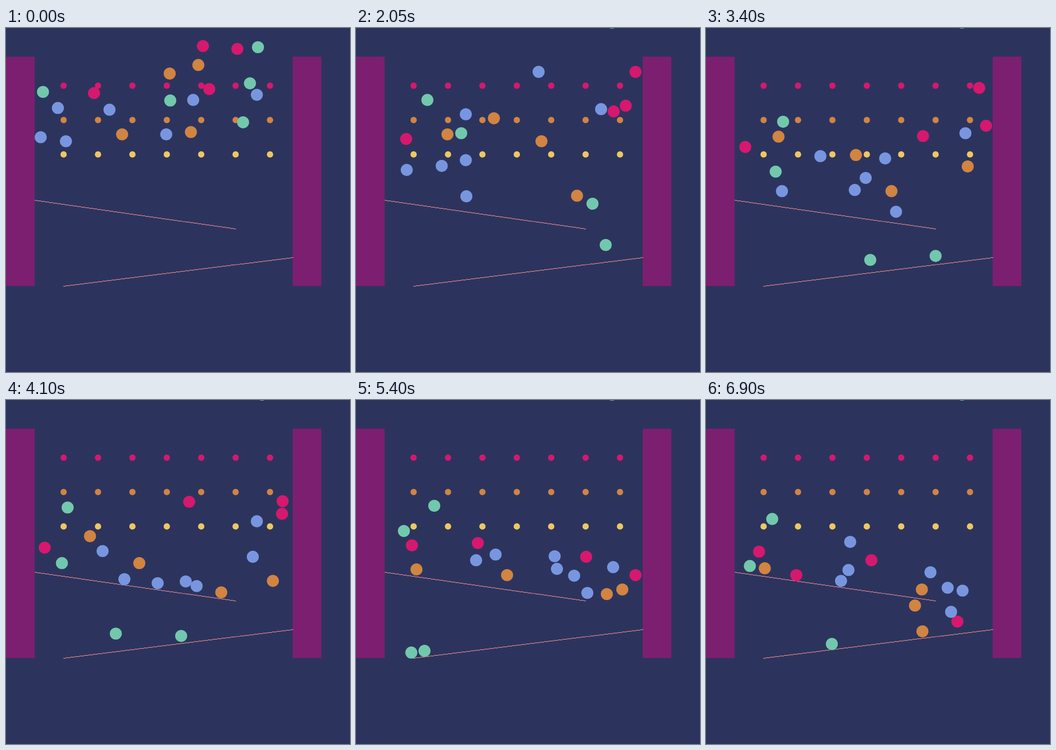
Write an HTML page that moves like this. It is 748 px wide and 748 px high and loops after 6950 ms.

```html
<!DOCTYPE html>
<html lang="en">
<head>
<meta charset="utf-8">
<title>Bouncing balls</title>
<style>
  html, body { margin: 0; width: 100%; height: 100%; overflow: hidden; background: #2c345e; }
  svg { display: block; width: 100vw; height: 100vh; }
</style>
</head>
<body>
<svg id="stage" viewBox="0 0 600 600"></svg>
<script>
const stage = document.getElementById('stage');
const LOOP = 6950, STEP = 50, SUBSTEPS = 20;
const GRAVITY = 80, BOUNCE = 0.75, BALL = 10, PEG = 5;
const PINK = '#d6186e', ORANGE = '#d28441', YELLOW = '#efc75e';
const GREEN = '#72c8ac', BLUE = '#7896e0', WALL = '#7d1f70', RAMP = '#ff9090';
const balls = [], obstacles = [];

const clamp = (v, lo, hi) => Math.max(lo, Math.min(hi, v));

function add(tag, attrs) {
  const node = document.createElementNS('http://www.w3.org/2000/svg', tag);
  for (const key in attrs) node.setAttribute(key, attrs[key]);
  return stage.appendChild(node);
}

// An obstacle is the nearest point of its shape plus a thickness around it.
function wall(x, y, width, height) {
  add('rect', { x, y, width, height, fill: WALL });
  obstacles.push({ r: 0, nearest: b => [clamp(b.x, x, x + width), clamp(b.y, y, y + height)] });
}

function peg(x, y, fill) {
  add('circle', { cx: x + 0.5, cy: y + 0.5, r: PEG + 0.5, fill });
  obstacles.push({ r: PEG, nearest: () => [x, y] });
}

function ramp(x1, y1, x2, y2) {
  const dx = x2 - x1, dy = y2 - y1, rows = Math.abs(dy), run = dx / rows;
  let d = '';
  for (let i = 0; i <= rows; i++) {
    const from = Math.ceil(clamp(x1 + (i - 0.5) * run, x1, x2));
    const to = Math.ceil(clamp(x1 + (i + 0.5) * run, x1, x2 + 1));
    d += `M${from} ${y1 + i * Math.sign(dy) + 0.5}H${to}`;
  }
  add('path', { d, stroke: RAMP, 'stroke-width': 1 });
  obstacles.push({
    r: 0,
    nearest(b) {
      const k = clamp(((b.x - x1) * dx + (b.y - y1) * dy) / (dx * dx + dy * dy), 0, 1);
      return [x1 + dx * k, y1 + dy * k];
    }
  });
}

function launch(fill, starts) {
  for (const [x, y, vx, vy] of starts) {
    balls.push({ x, y, vx, vy, gone: false, track: [], node: add('circle', { r: BALL + 0.5, fill }) });
  }
}

function hitObstacle(b, { r, nearest }) {
  const [px, py] = nearest(b);
  const dx = b.x - px, dy = b.y - py, gap = Math.hypot(dx, dy), reach = BALL + r;
  if (gap >= reach || gap === 0) return;
  const nx = dx / gap, ny = dy / gap, speed = b.vx * nx + b.vy * ny;
  b.x = px + nx * reach;
  b.y = py + ny * reach;
  if (speed < 0) {
    b.vx -= (1 + BOUNCE) * speed * nx;
    b.vy -= (1 + BOUNCE) * speed * ny;
  }
}

function hitBall(a, b) {
  const dx = a.x - b.x, dy = a.y - b.y, gap = Math.hypot(dx, dy);
  if (gap >= 2 * BALL || gap === 0) return;
  const nx = dx / gap, ny = dy / gap;
  const speed = (a.vx - b.vx) * nx + (a.vy - b.vy) * ny;
  const push = BALL - gap / 2, kick = speed < 0 ? -(1 + BOUNCE) / 2 * speed : 0;
  for (const [ball, side] of [[a, 1], [b, -1]]) {
    ball.x += side * push * nx;
    ball.y += side * push * ny;
    ball.vx += side * kick * nx;
    ball.vy += side * kick * ny;
  }
}

function advance(dt) {
  const live = balls.filter(b => !b.gone);
  live.forEach((b, i) => {
    b.x += b.vx * dt;
    b.y += b.vy * dt + GRAVITY * dt * dt / 2;
    b.vy += GRAVITY * dt;
    for (const o of obstacles) hitObstacle(b, o);
    for (let j = 0; j < i; j++) hitBall(b, live[j]);
    if (b.y < -BALL) b.gone = true;
  });
}

wall(0, 50, 50, 400);
wall(500, 50, 50, 400);
ramp(50, 300, 400, 350);
ramp(100, 450, 500, 400);
[PINK, ORANGE, YELLOW].forEach((fill, row) => {
  for (let col = 0; col < 7; col++) peg(100 + 60 * col, 100 + 60 * row, fill);
});

// Each start is x, y and velocity per second.
launch(PINK, [[343, 31, 80, -34], [403, 36, 96, 47], [153, 113, -59, 58], [354, 106, -76, 71]]);
launch(ORANGE, [[285, 79, -53, -17], [335, 64, 40, 40], [202, 185, -27, -45], [322, 181, 14, -18]]);
launch(GREEN, [[439, 33, 16, -120], [64, 111, 80, -2], [286, 126, -43, -14], [425, 96, 6, 20],
  [413, 164, 10, 22]]);
launch(BLUE, [[326, 125, -4, -106], [90, 139, -50, -29], [180, 142, 30, -38], [437, 116, 49, 69],
  [104, 197, 40, -14], [60, 190, 3, 21], [279, 185, -79, 86]]);

// Run the whole loop once, so any moment can be drawn from its time alone.
for (let ms = 0; ms < LOOP; ms += STEP) {
  for (const b of balls) b.track.push([Math.round(b.x) + 0.5, Math.round(b.y) + 0.5]);
  for (let i = 0; i < SUBSTEPS; i++) advance(STEP / 1000 / SUBSTEPS);
}

function draw(ms) {
  const index = Math.floor(ms % LOOP / STEP);
  for (const { track, node } of balls) {
    const [x, y] = track[index];
    node.setAttribute('cx', x);
    node.setAttribute('cy', y);
  }
}

const start = performance.now();
function tick() {
  draw(performance.now() - start);
  requestAnimationFrame(tick);
}
tick();
</script>
</body>
</html>
```
